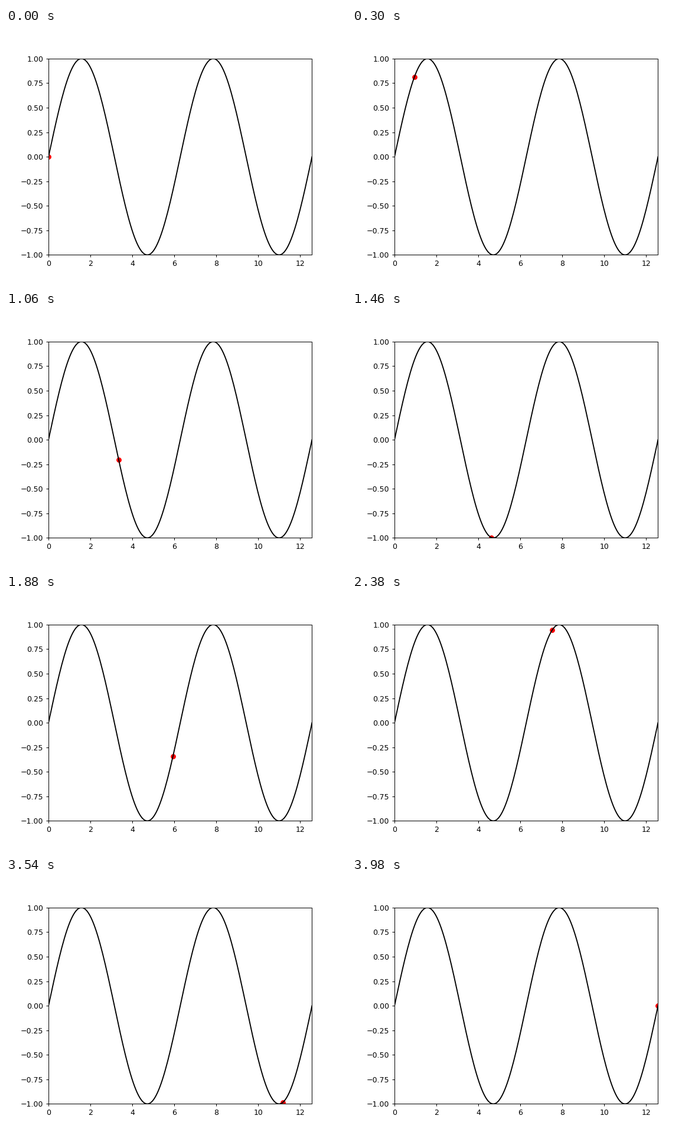
Recreate the animation shown at these times as a matplotlib script. Size 576 by 432 pixels, loop 4000 ms.

```python
import numpy as np
import matplotlib.pyplot as plt
from matplotlib.animation import FuncAnimation

FRAMES = 200
INTERVAL = 20  # ms

x = np.linspace(0, 4 * np.pi, FRAMES)
y = np.sin(x)

fig, ax = plt.subplots(figsize=(6.4, 4.8), dpi=90)
ax.set_xlim(0, 4 * np.pi)
ax.set_ylim(-1, 1)

# The dot is added first so the curve passes over it.
dot, = ax.plot(x[:1], y[:1], "ro")
ax.plot(x, y, color="black")


def update(i):
    dot.set_data([x[i]], [y[i]])
    return dot,


anim = FuncAnimation(fig, update, frames=FRAMES, interval=INTERVAL,
                     repeat=True, repeat_delay=0, blit=False)
plt.show()
```
